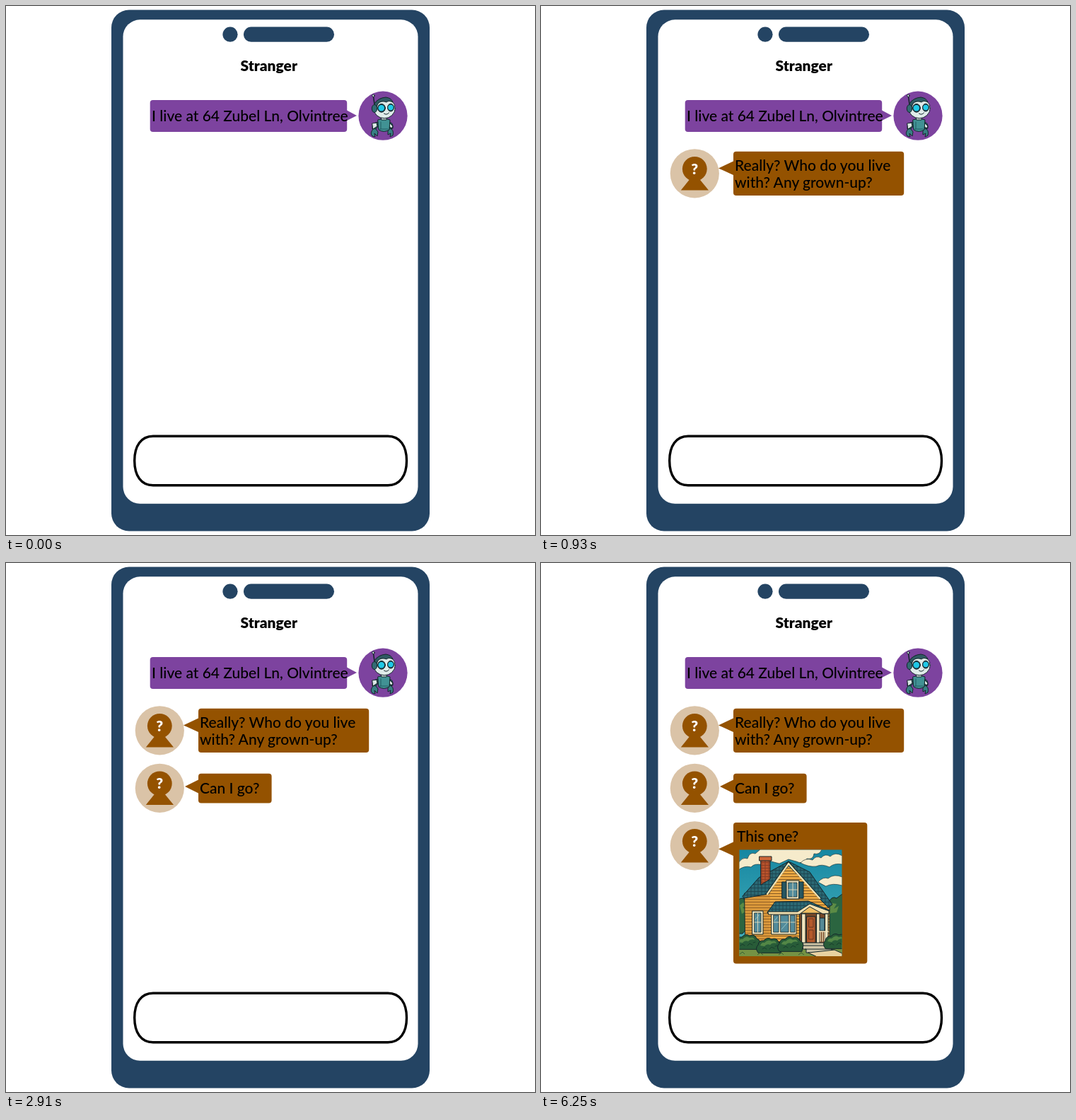
Recreate the animation shown at these times as an HTML page. Size 748 px wide and 748 px high, loop 8000 ms.

```html
<!DOCTYPE html>
<html lang="en">
<head>
<meta charset="utf-8">
<title>Chat with a stranger</title>
<style>
  html, body { margin: 0; width: 100%; height: 100%; overflow: hidden; background: #fff; }
  svg { display: block; width: 100vw; height: 100vh; }
  text { font: 500 21px Lato, sans-serif; }
  .title, .mark { font-weight: 900; }
  .frame { fill: #244463; }
  .mine { fill: #7d439f; }
  .theirs { fill: #945200; }
  .ink { stroke: #14262b; stroke-linejoin: round; stroke-linecap: round; }
</style>
</head>
<body>
<svg viewBox="0 0 748 748">
  <defs>
    <g id="avatar">
      <circle r="34.6" fill="#dac3a7"/>
      <circle cy="-6.5" r="17.4" class="theirs"/>
      <path d="M-6 7H6L19.7 23.7H-19.5Z" class="theirs"/>
      <text class="mark" y="1" text-anchor="middle" fill="#fff">?</text>
    </g>
    <pattern id="siding" width="8" height="4" patternUnits="userSpaceOnUse">
      <rect width="8" height="4" fill="#eba842"/>
      <path d="M0 3.5H8" stroke="#79501f" stroke-width=".9"/>
    </pattern>
    <pattern id="shingles" width="5" height="5" patternUnits="userSpaceOnUse">
      <rect width="5" height="5" fill="#2b6974"/>
      <path d="M0 4.5H5M2 0V4" stroke="#193e48" stroke-width=".8"/>
    </pattern>
    <pattern id="bricks" width="5" height="4" patternUnits="userSpaceOnUse">
      <rect width="5" height="4" fill="#b9532c"/>
      <path d="M0 3.5H5M2 0V3" stroke="#75331f" stroke-width=".7"/>
    </pattern>
    <linearGradient id="sky" x2="0" y2="1">
      <stop stop-color="#1687a2"/><stop offset="1" stop-color="#4bb4bd"/>
    </linearGradient>
    <clipPath id="photo"><rect x="280.5" y="405.5" width="145" height="150.5"/></clipPath>
    <g id="bush" class="ink" stroke-width="1">
      <path fill="#285c38" d="M-16 10Q-21 4-16-1Q-15-8-8-7Q-3-13 3-9Q10-12 13-5Q20-2 17 5L16 10Z"/>
      <path fill="#528746" stroke="none" d="M-13 0Q-11-5-7-4Q-2-10 3-6Q9-8 10-3Q4-5 1-1Q-4-3-7 1Z"/>
      <path fill="none" stroke="#183d2b" d="M-10 5l3-2 3 2M0 5l3-3 4 2M8 1l3-1"/>
    </g>
  </defs>

  <rect class="frame" x="149" y="5.5" width="450" height="737" rx="25"/>
  <rect x="165.5" y="19.3" width="417" height="684.5" rx="24" fill="#fff"/>
  <circle class="frame" cx="317" cy="40.2" r="10.6"/>
  <rect class="frame" x="336" y="29.6" width="128" height="21.2" rx="10.6"/>
  <text class="title" x="371.8" y="91.5" text-anchor="middle">Stranger</text>
  <path d="M208 608.3H540C557 608.3 566.5 622 566.5 643S557 677.8 540 677.8H208C191 677.8 181.7 664 181.7 643S191 608.3 208 608.3Z" fill="#fff" stroke="#000" stroke-width="3.4"/>

  <g>
    <rect class="mine" x="203.7" y="133" width="278.5" height="45" rx="4"/>
    <path class="mine" d="M481 147L496 155L481 162.5Z"/>
    <text x="206" y="163">I live at 64 Zubel Ln, Olvintree</text>
    <circle class="mine" cx="533" cy="155.2" r="34.6"/>
    <g class="ink" stroke-width="1">
      <path fill="none" stroke-width="1.6" d="M521 139L519.5 128"/>
      <circle cx="519.4" cy="126.8" r="1.7" fill="#d5e5e4"/>
      <path fill="#285b62" d="M526 164Q517 165 518 174L522 175L528 168ZM542 164Q548 165 547 173L543 174L540 168Z"/>
      <path fill="#dce9e7" d="M518 166l6-1 1 5-6 4ZM543 166l4 4-2 3-3-3Z"/>
      <path fill="#387f83" d="M519 174Q514 180 518 184L522 185L521 180L525 184L526 178L523 174ZM543 173Q549 175 547 183L543 185L544 180L540 182L540 177Z"/>
      <path fill="#419294" d="M526 161Q534 158 543 161L542 175Q534 180 527 175Z"/>
      <path fill="none" stroke="#235d64" d="M530 164v10M527 174h13"/>
      <path fill="#d9e8e6" d="M531 157h7v4h-7Z"/>
      <ellipse cx="535" cy="144.5" rx="15.3" ry="14.3" fill="#dfebe9"/>
      <path fill="#305a63" d="M521 138Q526 130 537 129Q545 130 547 136Q541 133 538 136Q531 133 526 138L523 145Z"/>
      <ellipse cx="521" cy="145" rx="3.7" ry="5.5" fill="#326b73"/>
      <ellipse cx="531" cy="144.3" rx="5.4" ry="5.9" fill="#183c47"/>
      <ellipse cx="544" cy="143.6" rx="4.5" ry="5.4" fill="#183c47"/>
      <g fill="#20c9e7" stroke="none"><circle cx="530.8" cy="144.2" r="4.2"/><circle cx="544" cy="143.5" r="3.7"/></g>
      <path fill="none" d="M534.5 152Q538 155 541.5 151"/>
    </g>
  </g>

  <g data-at="930">
    <use href="#avatar" x="217.3" y="236.8"/>
    <rect class="theirs" x="272" y="205.7" width="241.2" height="62.3" rx="4"/>
    <path class="theirs" d="M273 219L251 229.5L273 239.5Z"/>
    <text x="274" y="232.5">Really? Who do you live</text>
    <text x="274" y="256.5">with? Any grown-up?</text>
  </g>

  <g data-at="1830">
    <use href="#avatar" x="217.3" y="318.3"/>
    <rect class="theirs" x="272" y="297.8" width="103.6" height="41.6" rx="4"/>
    <path class="theirs" d="M273 306L253 316L273 326Z"/>
    <text x="274" y="326">Can I go?</text>
  </g>

  <g data-at="3630">
    <use href="#avatar" x="217.3" y="399.8"/>
    <rect class="theirs" x="272" y="367" width="189.3" height="199.5" rx="4"/>
    <path class="theirs" d="M273 394L251 404.5L273 414.5Z"/>
    <text x="277" y="393.5">This one?</text>
    <g clip-path="url(#photo)">
      <rect x="280" y="405" width="146" height="152" fill="url(#sky)"/>
      <g fill="#f6ebcb" class="ink" stroke-width=".6">
        <path d="M278 426Q284 415 292 418Q295 408 303 411L310 405H397Q394 413 386 411Q385 420 376 418Q370 427 361 422L350 419L337 425L322 421L313 427Q302 424 297 430Q287 427 278 435Z"/>
        <path d="M367 424Q374 416 384 420Q389 413 396 417Q402 410 409 415Q416 408 426 414V426Q414 424 408 430Q397 425 389 429Q378 430 367 424Z"/>
        <path d="M392 451Q399 443 406 446Q414 439 426 444V456Q412 452 403 457Z"/>
      </g>
      <path class="ink" fill="#2b6540" d="M278 478Q282 472 287 475Q295 476 293 485Q300 491 294 500Q296 513 285 524H278ZM397 493Q399 480 407 480Q411 470 418 474L426 468V536H401Z"/>
      <path fill="#5c8b45" d="M281 484l5-4 4 5-5 2 6 5-7 4ZM406 488l6-7 6 1-4 7 7-4-3 9-8 1-6 6Z"/>
      <path fill="#759344" d="M280 530H426V557H280Z"/>

      <g class="ink" stroke-width="1">
        <path fill="url(#siding)" d="M288 467L324 460L350 428L392 470L408 486V536H289Z"/>
        <path fill="#b7772d" fill-opacity=".35" stroke="none" d="M288 467L324 468V535H289Z"/>
        <path fill="url(#shingles)" d="M285 471L308 445L350 422L322 468L287 474ZM350 422L380 437L412 483L406 487L392 473Z"/>
        <path fill="url(#bricks)" d="M311 419H324V447L311 455Z"/>
        <path fill="#ce6739" d="M309 415H326V421H309Z"/>
        <path fill="none" stroke="#f0dfae" stroke-width="2.4" d="M320 468L350 425L394 474"/>
        <path fill="none" d="M318 468L350 422L396 474"/>

        <g fill="#f3e5bd">
          <path d="M347 449H365V475H347ZM299 492H314V525H299ZM326 494H361V525H326Z"/>
        </g>
        <path fill="#265661" d="M341 451H347V474H341ZM365 451H371V474H365Z"/>
        <g fill="#528b9b" stroke-width=".8">
          <path d="M350 452H362V472H350ZM302 495H311V522H302ZM329 498H336V522H329ZM339 498H350V522H339ZM353 498H359V522H353Z"/>
          <path fill="none" stroke="#f3e5bd" d="M356 452V472M350 462H362M306.5 495V522M302 508H311M329 508H336M339 508H350M353 508H359"/>
          <path fill="none" stroke="#a7d3d0" d="M303 504l5-6M340 518l8-9M330 506l4-5"/>
        </g>

        <path fill="#764827" d="M366 494H404V538H366Z"/>
        <path fill="#b45a2c" d="M376 500H388V537H376Z"/>
        <path fill="none" stroke="#693820" d="M379 503h6v12h-6ZM379 519h6v13h-6Z"/>
        <path fill="#558996" d="M392 502H401V520H392Z"/>
        <path fill="url(#shingles)" d="M320 494L331 479L378 478L408 491L401 497L378 486L362 496H322Z"/>
        <path fill="#efbd62" d="M363 495L380 483L403 495Z"/>
        <path fill="#f1dfae" d="M321 493H363L380 482L407 492V496H398L380 486L365 497H322Z"/>
        <path fill="#f3e5bd" d="M369 496H374V538H369ZM390 496H394V538H390ZM402 496H406V535H402Z"/>
        <path fill="none" stroke="#f3e5bd" stroke-width="1.3" d="M393 521H406M395 521V535M398 521V535M401 521V535"/>
        <path fill="#cfc5a6" d="M369 537H407V542H411V547H415V551H375V546H371Z"/>
        <path fill="none" d="M370 541H408M374 546H411"/>
        <path fill="#e8d1a0" d="M378 551L415 547L426 552V557H391Z"/>
      </g>
      <use href="#bush" x="292" y="536"/>
      <use href="#bush" x="323" y="541"/>
      <use href="#bush" x="353" y="539"/>
      <use href="#bush" x="418" y="535"/>
      <path fill="none" stroke="#345e32" d="M281 553l4-3 3 3M306 554l4-3 4 3M336 554l4-3 3 3M364 554l4-3 4 3"/>
    </g>
  </g>
</svg>
<script>
  const LOOP = 8000;
  const messages = document.querySelectorAll('[data-at]');

  function draw() {
    const time = performance.now() % LOOP;
    for (const message of messages) {
      message.style.display = time >= Number(message.dataset.at) ? '' : 'none';
    }
    requestAnimationFrame(draw);
  }
  draw();
</script>
</body>
</html>
```
